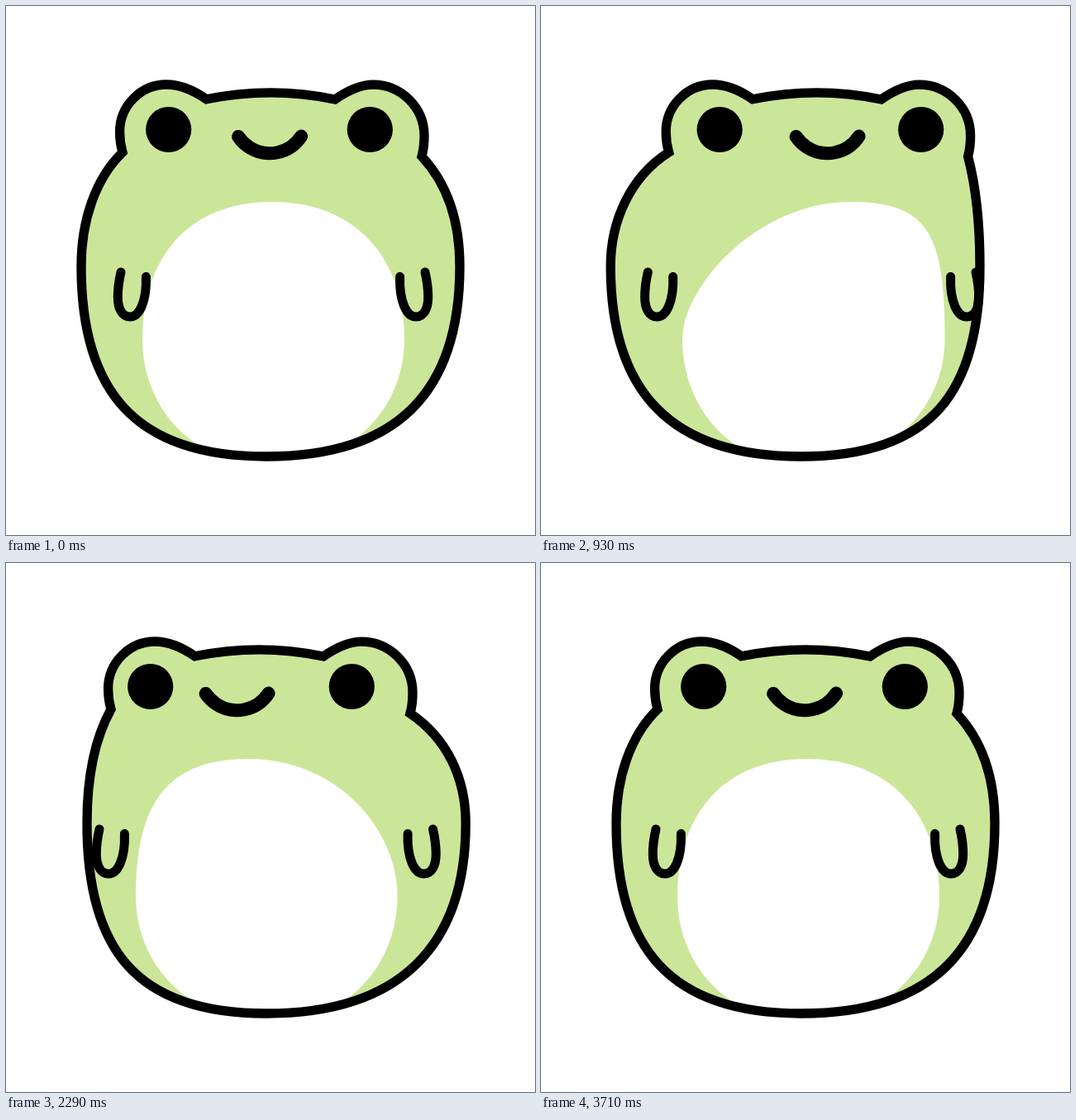
These frames come from a looping animation (640x640 px, 3780 ms). An HTML page with a canvas:

```html
<!DOCTYPE html>
<html lang="en">
<head>
<meta charset="utf-8">
<title>Frog looking around</title>
<style>
  html, body { margin: 0; width: 100%; height: 100%; overflow: hidden; background: #fff; }
  canvas { display: block; width: 100vmin; height: 100vmin; margin: auto; }
</style>
</head>
<body>
<canvas id="stage" width="640" height="640"></canvas>
<script>
const ctx = document.getElementById('stage').getContext('2d');
const LOOP = 3780, FPS = 14;
const GREEN = '#cbe698', INK = '#000', WHITE = '#fff';

// Heights shared by all poses.
const SIDE_Y = 315, FOOT_X = 315, FOOT_Y = 545;
const BELLY_TOP_Y = 237, BELLY_SIDE_Y = 403, BELLY_FOOT_X = 320, BELLY_FOOT_Y = 555;

// head to armR are offsets, the rest are x positions.
const center = { head: 0, eyes: 0, mouth: 0, armL: 0, armR: 0,
  sideL: 91, sideR: 549, bellyTop: 322, bellyL: 165, bellyR: 482 };
const right = { head: 13.6, eyes: 19.4, mouth: 27.5, armL: -9.7, armR: 19,
  sideL: 84.2, sideR: 531, bellyTop: 375, bellyL: 171, bellyR: 488.5 };
const left = { head: -14, eyes: -22, mouth: -39.5, armL: -26, armR: 9.5,
  sideL: 98, sideR: 556.2, bellyTop: 293, bellyL: 157, bellyR: 473.5 };

// Times in seconds; the eyes may arrive before the rest.
const moves = [
  { from: center, to: right, start: 0.6, end: 0.93, eyeEnd: 0.93 },
  { from: right, to: left, start: 1.925, end: 2.285, eyeEnd: 2.285 },
  { from: left, to: center, start: 3.22, end: 3.67, eyeEnd: 3.52 }
];

const mix = (a, b, k) => a + (b - a) * k;

function ease(t, start, end) {
  const s = Math.min(1, Math.max(0, (t - start) / (end - start)));
  return s * s * (3 - 2 * s);
}

function poseAt(t) {
  const { from, to, start, end, eyeEnd } = moves.filter(m => t >= m.start).pop() || moves[0];
  const pose = {};
  for (const key in from) {
    pose[key] = mix(from[key], to[key], ease(t, start, key === 'eyes' ? eyeEnd : end));
  }
  return pose;
}

function eyeOpen(t) {
  return 1 - 0.8 * (ease(t, 0.46, 0.6) - ease(t, 0.6, 0.74));
}

// Control points for the flank between an ear and the widest point.
function flank(earX, earY, sideX) {
  const reach = sideX - earX;
  return [earX + 0.66 * reach, earY + 38 - 0.12 * Math.abs(reach), sideX, SIDE_Y - 55];
}

function bodyPath({ head, sideL, sideR }) {
  const path = new Path2D();
  const x = v => v + head;
  const quad = (cx, cy, px, py) => path.quadraticCurveTo(x(cx), cy, x(px), py);

  path.moveTo(x(141), 177);
  quad(137.6, 165, 137.6, 152);
  path.bezierCurveTo(x(137.6), 121, x(163), 95, x(194), 95);
  quad(217, 95, 242.5, 112.8);
  quad(320.5, 96.8, 398, 113);
  quad(424, 95.2, 444, 95.2);
  path.bezierCurveTo(x(478), 95.2, x(506), 123, x(506), 157);
  quad(506, 171, 503, 182);

  path.bezierCurveTo(...flank(x(503), 182, sideR), sideR, SIDE_Y);
  path.bezierCurveTo(sideR, SIDE_Y + 150, FOOT_X + 160, FOOT_Y, FOOT_X, FOOT_Y);
  path.bezierCurveTo(FOOT_X - 160, FOOT_Y, sideL, SIDE_Y + 150, sideL, SIDE_Y);
  const [ex, ey, sx, sy] = flank(x(141), 177, sideL);
  path.bezierCurveTo(sx, sy, ex, ey, x(141), 177);
  path.closePath();
  return path;
}

// The narrower a half of the belly is, the squarer its shoulder.
function bellyHalf(path, top, side) {
  const width = Math.abs(side - top), dir = Math.sign(side - top);
  path.moveTo(top, BELLY_TOP_Y);
  path.bezierCurveTo(top + dir * (70 + 0.22 * width), BELLY_TOP_Y,
    side, BELLY_SIDE_Y - 205 + 0.7 * width, side, BELLY_SIDE_Y);
  path.bezierCurveTo(side, BELLY_SIDE_Y + 77,
    mix(BELLY_FOOT_X, side, 0.65), BELLY_FOOT_Y, BELLY_FOOT_X, BELLY_FOOT_Y);
}

function bellyPath({ bellyTop, bellyL, bellyR }) {
  const path = new Path2D();
  bellyHalf(path, bellyTop, bellyL);
  bellyHalf(path, bellyTop, bellyR);
  // Covers the seam where the two halves meet.
  path.moveTo(bellyTop - 2, BELLY_TOP_Y + 1);
  path.lineTo(BELLY_FOOT_X - 2, BELLY_FOOT_Y);
  path.lineTo(BELLY_FOOT_X + 2, BELLY_FOOT_Y);
  path.lineTo(bellyTop + 2, BELLY_TOP_Y + 1);
  return path;
}

const arm = new Path2D('M139 322C136 335 135.3 342 135.3 352' +
  'C135.3 367 141 376 150 376C161 376 170.5 358 169.4 327.5');
const mouth = new Path2D();
mouth.arc(319, 132.6, 45.6, 0.58, Math.PI - 0.59);

function strokeAt(path, x, width, flip = 1) {
  ctx.save();
  ctx.translate(x, 0);
  ctx.scale(flip, 1);
  ctx.lineWidth = width;
  ctx.lineCap = 'round';
  ctx.stroke(path);
  ctx.restore();
}

function draw(t) {
  const pose = poseAt(t);
  const body = bodyPath(pose);

  ctx.fillStyle = WHITE;
  ctx.fillRect(0, 0, 640, 640);
  ctx.fillStyle = GREEN;
  ctx.fill(body);

  ctx.save();
  ctx.clip(body);
  ctx.fillStyle = WHITE;
  for (const side of [pose.bellyL, pose.bellyR]) {
    const half = new Path2D();
    bellyHalf(half, pose.bellyTop, side);
    ctx.fill(half);
  }
  ctx.strokeStyle = WHITE;
  ctx.lineWidth = 2;
  ctx.beginPath();
  ctx.moveTo(pose.bellyTop, BELLY_TOP_Y + 1);
  ctx.lineTo(BELLY_FOOT_X, BELLY_FOOT_Y);
  ctx.stroke();
  ctx.restore();

  ctx.strokeStyle = ctx.fillStyle = INK;
  ctx.lineWidth = 11.3;
  ctx.stroke(body);

  strokeAt(arm, pose.armL, 11);
  strokeAt(arm, 646 + pose.armR, 11, -1);
  strokeAt(mouth, pose.mouth, 16);

  for (const x of [196.7, 440.3]) {
    ctx.beginPath();
    ctx.ellipse(x + pose.eyes, 149.5, 27.6, 27.6 * eyeOpen(t), 0, 0, Math.PI * 2);
    ctx.fill();
  }
}

// The motion is stepped at a fixed frame rate.
function tick() {
  const ms = performance.now() % LOOP;
  draw(Math.floor((ms + 5) * FPS / 1000) / FPS);
  requestAnimationFrame(tick);
}
tick();
</script>
</body>
</html>
```
